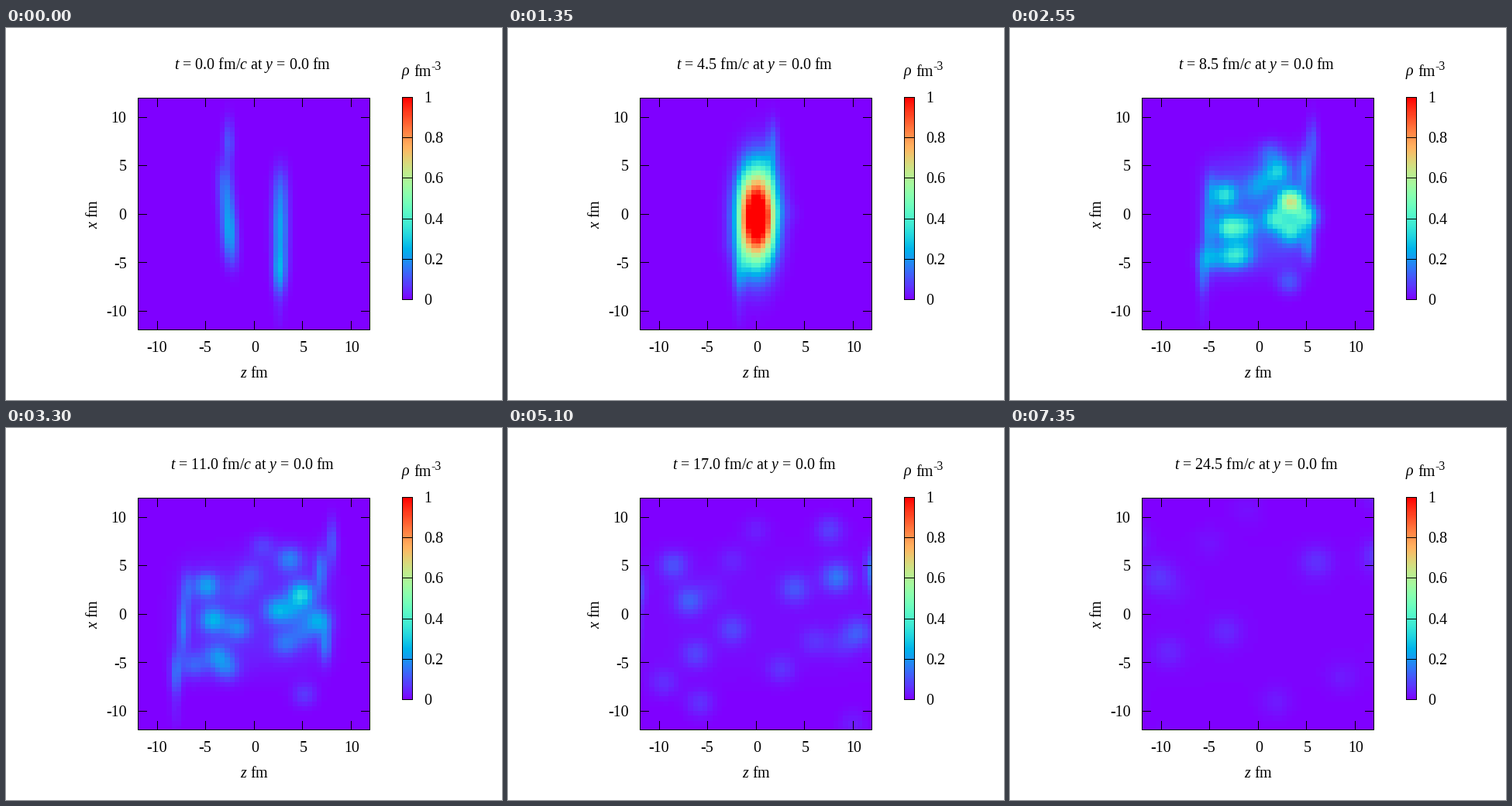
Animation of 640 by 480 pixels, one loop 7.5 s. Source, as a matplotlib script:

```python
import numpy as np
import matplotlib as mpl
import matplotlib.pyplot as plt
from matplotlib.animation import FuncAnimation

SERIF = "Liberation Serif"
mpl.rcParams.update({"font.family": SERIF, "mathtext.fontset": "custom",
                     "mathtext.it": SERIF + ":italic"})
for kind in ("rm", "cal", "sf", "tt", "bf"):
    mpl.rcParams["mathtext." + kind] = SERIF

W, H, DPI = 640, 480, 100
FRAMES, INTERVAL, DT = 50, 150, 0.5
SCALE, CX, CY = 12.5, 320, 240        # pixels per fm, centre of the map
T_HIT, SPEED, T_REF = 2.7, 0.97, 11

cells = np.arange(-12, 12, 0.5) + 0.25
Z, X = np.meshgrid(cells, cells)

# velocity along z, x, half length, density
SPECTATORS = [
    (SPEED, 7.4, 1.7, 0.11),
    (-SPEED, -6.2, 1.7, 0.13),
    (-SPEED, -10.5, 1.1, 0.025),
]
FRONTS = [
    (0.83, 4.5, 1.5, 0.14),
    (0.89, -3.1, 1.3, 0.14),
    (-0.88, -1.2, 1.9, 0.14),
    (-0.83, 2.6, 1.3, 0.08),
]
# z, x, velocity along z and x, density, all at T_REF
FRAGMENTS = [
    (-4.2, -0.6, -0.45, 0.33, 0.21),
    (-4.9, 2.9, -0.60, 0.36, 0.18),
    (-1.7, -1.4, -0.12, -0.03, 0.15),
    (-3.8, -4.3, -0.40, 0.03, 0.14),
    (-2.8, -5.6, -0.50, -0.60, 0.12),
    (-6.2, -5.3, -0.55, -0.30, 0.10),
    (-0.3, 4.1, -0.35, 0.25, 0.07),
    (-1.6, 2.4, -0.50, 0.00, 0.06),
    (2.4, 0.4, 0.27, 0.37, 0.19),
    (4.9, 2.0, 0.57, 0.30, 0.28),
    (6.6, -0.7, 0.65, -0.20, 0.20),
    (3.7, 5.7, 0.65, 0.50, 0.15),
    (0.9, 7.0, -0.15, 0.28, 0.07),
    (3.2, -3.0, -0.10, -0.45, 0.11),
    (4.0, 0.2, 0.35, -0.50, 0.10),
    (5.0, -2.0, 0.65, -0.20, 0.08),
    (5.2, -8.3, 0.80, -0.50, 0.07),
]


def ease(t, start, end):
    s = np.clip((t - start) / (end - start), 0, 1)
    return s * s * (3 - 2 * s)


def lump(z, x, sz, sx, pz=2, px=2):
    """Bell with half widths sz, sx; higher powers flatten the top."""
    return np.exp(-(np.abs((Z - z) / sz) ** pz + np.abs((X - x) / sx) ** px) / 2)


def nuclei(t):
    z = SPEED * (t - T_HIT)
    tilted = z - 0.1 - 0.08 * X
    rho = lump(tilted, -0.2, 0.58, 4.3, px=4) * 0.18
    rho += lump(z + 0.2, -1.5, 0.5, 1.6) * 0.06
    rho += lump(-z + 0.1, -1.4, 0.58, 5.1, px=4) * 0.18
    rho += lump(-z, -1.2, 0.5, 1.6) * 0.05
    return rho * (1 - ease(t, 2.5, 5))


def fireball(t):
    age = t - T_HIT
    grown = max(age, 0)
    amp = 2.45 * np.exp(-(age / (2 if age > 0 else 1)) ** 2)
    rho = amp * lump(0.1, -0.25, np.hypot(0.75, 0.6 * grown), 3.35)
    if t > 4:
        # thinning slab between the two fronts
        haze = 0.23 * (3.8 / age) ** 2 * ease(t, 4, 6.5)
        rho += haze * lump(0, 0.2 * Z * 3.8 / age, 0.9 * age,
                           4.6 + 0.1 * age, pz=6, px=4)
    return rho


def strips(t, rows):
    return sum(amp * lump(v * (t - T_HIT), x, 0.42, length)
               for v, x, length, amp in rows)


def fragments(t):
    if t <= 4:
        return 0
    dt = t - T_REF
    size = 0.7 + 0.02 * t
    rho = sum(amp * lump(z + vz * dt, x + vx * dt, size, size)
              for z, x, vz, vx, amp in FRAGMENTS)
    return rho * (T_REF / t) ** 1.5 * ease(t, 4, 8.5)


def field(t):
    return (nuclei(t) + fireball(t) + strips(t, SPECTATORS)
            + strips(t, FRONTS) * ease(t, 4, 7) + fragments(t))


fig = plt.figure(figsize=(W / DPI, H / DPI), dpi=DPI, facecolor="white")
ax = fig.add_axes([0, 0, 1, 1])
ax.set_xlim(0, W)
ax.set_ylim(H, 0)
ax.axis("off")


def label(x, y, s, px=20, **kw):
    kw = {"va": "baseline", **kw}
    return ax.text(x, y, s, fontsize=px * 72 / DPI, color="black", **kw)


def line(*points):
    xs, ys = zip(*points)
    ax.plot(xs, ys, color="black", lw=72 / DPI, snap=False,
            solid_capstyle="projecting", solid_joinstyle="miter")


def box(l, t, r, b):
    line((l, t), (r, t), (r, b), (l, b), (l, t))


style = dict(cmap="rainbow", vmin=0, vmax=1, origin="lower",
             interpolation="nearest", aspect="auto")
density = ax.imshow(field(0), extent=(170, 470, 390, 90), **style)
ax.imshow(np.linspace(0, 1, 256)[:, None], extent=(511, 525, 351, 89), **style)

L, R, T, B, TICK = 170.5, 469.5, 90.5, 389.5, 11
for v in range(-10, 11, 5):
    px, py = CX + v * SCALE, CY - v * SCALE
    tx, ty = int(px) + 0.5, int(py) + 0.5
    line((tx, T), (tx, T + TICK))
    line((tx, B), (tx, B - TICK))
    line((L, ty), (L + TICK, ty))
    line((R, ty), (R - TICK, ty))
    label(px + (1 if v >= 0 else -0.5), 418, str(v), ha="center")
    label(155.5, py + 7, str(v), ha="right")
box(L, T, R, B)

for i in range(6):
    y = int(350.5 - 52.2 * i) + 0.5
    line((511.5, y), (524.5, y))
    label(539, y + 6.5, f"{i / 5:g}")
box(511.5, 89.5, 524.5, 350.5)

label(301.5, 451, "$z$ fm")
label(118, 240, "$x$ fm", rotation=90, rotation_mode="anchor", ha="center")
label(511, 61.5, "ρ", style="italic")
label(526.5, 61.5, "fm")
label(548.5, 54.5, "-3", px=16)
title = label(318.5, 53, "", ha="center")


def update(i):
    t = i * DT
    density.set_data(field(t))
    title.set_text(f"$t$ = {t:.1f} fm/$c$ at $y$ = 0.0 fm")
    return density, title


anim = FuncAnimation(fig, update, frames=FRAMES, init_func=lambda: update(0),
                     interval=INTERVAL, repeat=True, repeat_delay=0)
plt.show()
```
